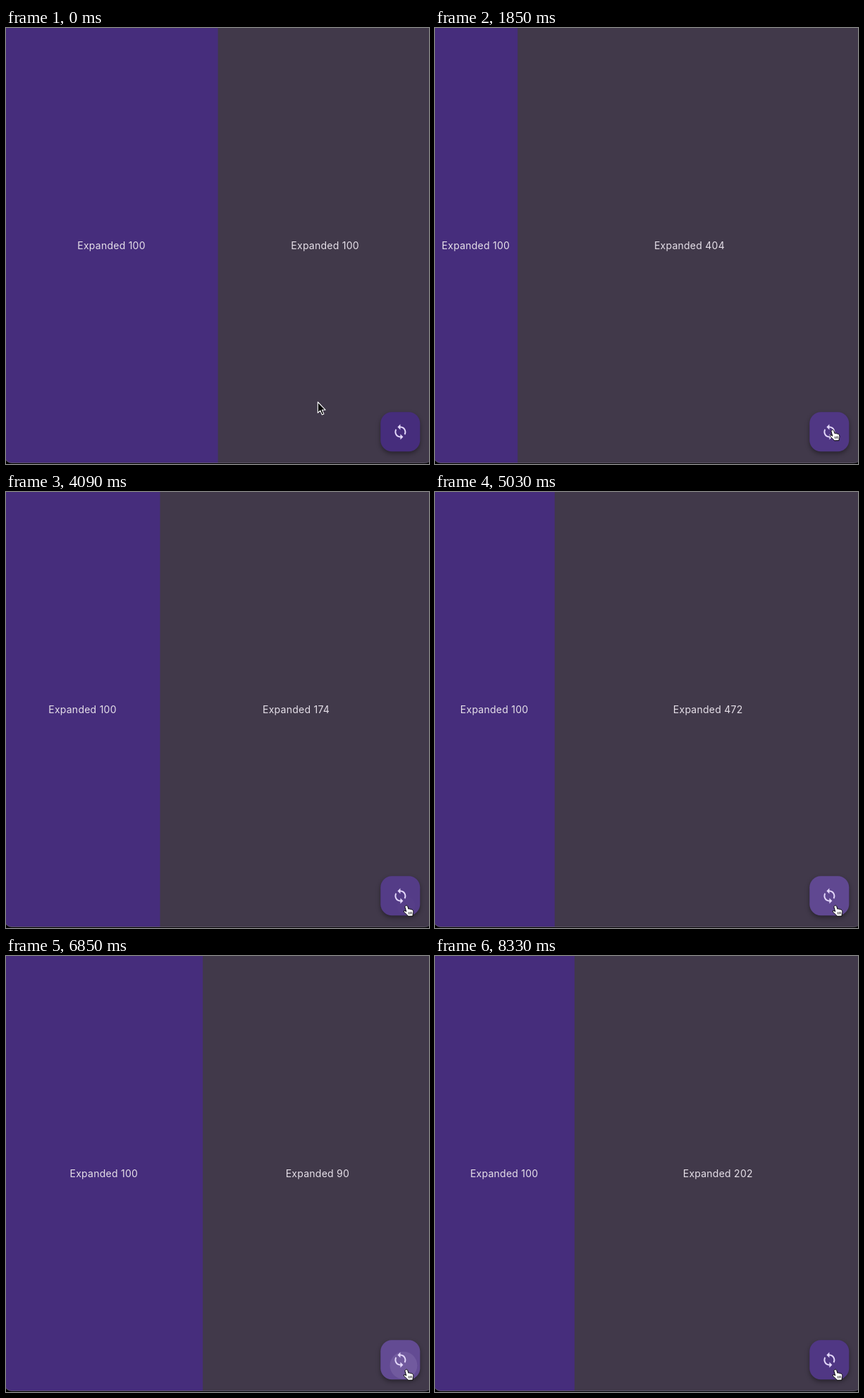
An HTML page for the animation above (8.88 s loop, 600 px wide and 619 px high).

```html
<!DOCTYPE html>
<html lang="en">
<head>
<meta charset="utf-8">
<title>Expanded panels</title>
<style>
  html, body { margin: 0; width: 100%; height: 100%; overflow: hidden; background: #000; }
  svg { display: block; width: 100vw; height: 100vh; }
  text {
    font: 14px Inter, Roboto, sans-serif;
    letter-spacing: .25px;
    fill: #e6e0e9;
    text-anchor: middle;
  }
  .fab { filter: drop-shadow(0 3px 3px rgba(0, 0, 0, .38)); }
</style>
</head>
<body>
<svg viewBox="0 0 600 619" preserveAspectRatio="none">
  <defs>
    <clipPath id="window"><rect x="-2" y="-20" width="606.5" height="637.5" rx="10"/></clipPath>
    <clipPath id="button"><rect x="531.3" y="545.3" width="56" height="56" rx="16"/></clipPath>
  </defs>
  <rect width="600" height="619" fill="#000"/>
  <g clip-path="url(#window)">
    <rect width="600" height="619" fill="#41394a"/>
    <rect id="left" width="300" height="619" fill="#462d7c"/>
  </g>
  <rect x="-2" y="-20" width="606.5" height="637.5" rx="10" fill="none" stroke="#686070" stroke-width=".8"/>
  <text id="leftText" y="314">Expanded 100</text>
  <text id="rightText" y="314">Expanded 100</text>

  <rect class="fab" x="531.3" y="545.3" width="56" height="56" rx="16" fill="#462d7c"/>
  <g clip-path="url(#button)" fill="#eaddff">
    <rect id="hover" x="531" y="545" width="57" height="57"/>
    <rect id="press" x="531" y="545" width="57" height="57"/>
    <circle id="splash"/>
  </g>
  <path transform="translate(547.4 561.4)" fill="#e4d8fa" d="M12 4V1L8 5l4 4V6c3.31 0 6 2.69 6 6 0 1.01-.25 1.97-.7 2.8l1.46 1.46C19.54 15.03 20 13.57 20 12c0-4.42-3.58-8-8-8zm0 14c-3.31 0-6-2.69-6-6 0-1.01.25-1.97.7-2.8L5.24 7.74C4.46 8.97 4 10.43 4 12c0 4.42 3.58 8 8 8v3l4-4-4-4v3z"/>

  <g id="cursor">
    <path id="arrow" fill="#000" stroke="#fff" stroke-width="1.1" stroke-linejoin="round"
      d="M.5 0V15.4L4 12.1 6.5 18 9 16.9 6.5 11.2H11.2Z"/>
    <g id="hand" transform="translate(-4.5 -1.5)" stroke="#000" stroke-linejoin="round">
      <path fill="#fff" stroke-width="1"
        d="M4.2 1.2C5.2.6 6.3 1.1 6.6 2.1L7.9 6.1C8.6 5.5 9.7 5.6 10.2 6.4 10.9 5.9 11.9 6.1 12.3 7 13.2 6.7 14.1 7.2 14.4 8.2 14.9 10 14.8 11.3 14.2 12.8L13.9 16 7.4 16.2C6.6 14.6 4.6 13.4 2.8 11.6 1.9 10.6 1.1 9.8.9 8.9 1.3 8.1 2.6 8.1 4.6 9.6L2.9 3.3C2.6 2.3 3.2 1.6 4.2 1.2Z"/>
      <path fill="none" stroke-width=".8" d="M8 10.3l.7 3.2M10.1 10l.5 3.3M12.1 9.8l.3 3.3"/>
    </g>
  </g>
</svg>
<script>
const LOOP = 8880, MOVE = 500;

// [press time, release time, new flex of the right panel]
const taps = [
  [1240, 1208, 404], [2210, 2250, 448], [3080, 3170, 174], [4080, 4160, 194],
  [4760, 4830, 472], [5790, 5826, 117], [6700, 6765, 90], [7520, 7580, 202]
];

// [time, x, y] of the pointer's hot spot
const path = [
  [30, 441.8, 531], [180, 449, 515], [330, 449, 515], [580, 562.3, 565.7],
  [1750, 562.3, 565.7], [2060, 567.6, 587.6]
];

const el = id => document.getElementById(id);
const set = (id, attrs) => {
  for (const k in attrs) el(id).setAttribute(k, attrs[k]);
};
const ramp = (t, a, b) => Math.min(1, Math.max(0, (t - a) / (b - a)));
const mix = (a, b, p) => a + (b - a) * p;
const edge = flex => 608 * 100 / (100 + flex) - 3.4;

// cubic-bezier(.42, 0, .58, 1)
function easeInOut(x) {
  let lo = 0, hi = 1;
  for (let i = 0; i < 24; i++) {
    const s = (lo + hi) / 2, r = 1 - s;
    if (3 * r * r * s * .42 + 3 * r * s * s * .58 + s * s * s < x) lo = s;
    else hi = s;
  }
  return lo * lo * (3 - 2 * lo);
}

function pointer(t) {
  let [, x, y] = path[0];
  for (let i = 1; i < path.length; i++) {
    const [t0] = path[i - 1], [t1, x1, y1] = path[i];
    const p = ramp(t, t0, t1), s = p * p * (3 - 2 * p);
    x = mix(x, x1, s);
    y = mix(y, y1, s);
  }
  return [x, y];
}

function drawPanels(t) {
  let flex = 100, w = edge(flex);
  for (const [, up, next] of taps) {
    if (t < up) break;
    flex = next;
    w = mix(w, edge(next), easeInOut(ramp(t, up, up + MOVE)));
  }
  set('left', { width: w });
  set('leftText', { x: (w - 1.5) / 2 });
  set('rightText', { x: (w + 604.6) / 2 });
  el('rightText').textContent = 'Expanded ' + flex;
}

function drawButton(t, x, y) {
  let glow = 0, alpha = 0, grow = 0;
  for (const [down, up] of taps) {
    if (t < down) continue;
    const end = Math.max(down, up);
    if (up > down) glow = .12 * ramp(t, down, down + 60) * (1 - ramp(t, up + 100, up + 200));
    alpha = .1 * ramp(t, down, down + 100) * (1 - ramp(t, end + 225, end + 375));
    grow = ramp(t, down, down + 260) ** 3;
  }
  const shift = Math.sqrt(grow);
  set('hover', { opacity: .06 * ramp(t, 540, 640) });
  set('press', { opacity: glow });
  set('splash', {
    cx: mix(x, 559.3, shift), cy: mix(y, 573.3, shift),
    r: mix(13, 46, grow), opacity: alpha
  });
}

function draw(now) {
  const t = now % LOOP, [x, y] = pointer(t), over = x > 531 && y > 545;
  drawPanels(t);
  drawButton(t, x, y);
  set('cursor', { transform: `translate(${x} ${y})` });
  set('arrow', { visibility: over ? 'hidden' : 'visible' });
  set('hand', { visibility: over ? 'visible' : 'hidden' });
}

const start = performance.now();
function tick() {
  draw(performance.now() - start);
  requestAnimationFrame(tick);
}
tick();
</script>
</body>
</html>
```
